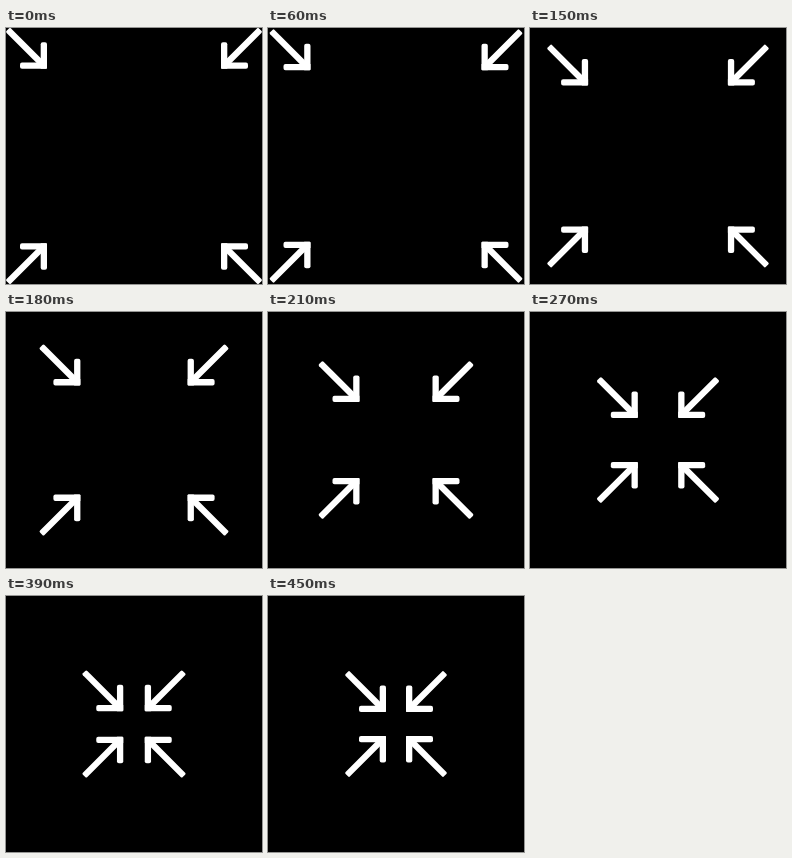
An HTML page with a canvas for the animation above (480 ms loop, 256 px wide and 256 px high).

```html
<!DOCTYPE html>
<html lang="en">
<head>
<meta charset="utf-8">
<title>Converging arrows</title>
<style>
  html, body { margin: 0; width: 100%; height: 100%; overflow: hidden; background: #000; }
  canvas { display: block; }
</style>
</head>
<body>
<canvas id="stage" width="256" height="256"></canvas>
<script>
const ctx = document.getElementById('stage').getContext('2d');
const LOOP = 480, STEP = 30;
const CENTER = 128;
const WIDTH = 6.3;

// Cubic bezier (0.62, 0, 0.16, 1), solved by bisection.
function ease(x) {
  let low = 0, high = 1;
  for (let i = 0; i < 24; i++) {
    const s = (low + high) / 2, r = 1 - s;
    if (3 * r * r * s * 0.62 + 3 * r * s * s * 0.16 + s ** 3 < x) low = s;
    else high = s;
  }
  return low * low * (3 - 2 * low);
}

function bar(x, y, w, h, radii) {
  ctx.beginPath();
  ctx.roundRect(x, y, w, h, radii);
  ctx.fill();
}

// Arrow pointing down-right, with the outer corner of its head at the origin.
function arrow() {
  bar(-WIDTH, -26.6, WIDTH, 26.6, [2, 2, 1, 0]);
  bar(-27, -WIDTH, 27, WIDTH, [2, 0, 1, 2]);
  ctx.save();
  ctx.translate(-39.2, -39.2);
  ctx.rotate(Math.PI / 4);
  bar(0, -WIDTH / 2, 50, WIDTH, [1.5, 0, 0, 1.5]);
  ctx.restore();
}

function draw(time) {
  const progress = ease(Math.floor(time % LOOP / STEP) * STEP / (LOOP - STEP));
  const dx = 87 - 77 * progress;
  const dy = 87.2 - 75.2 * progress;
  ctx.fillStyle = '#000';
  ctx.fillRect(0, 0, 256, 256);
  ctx.fillStyle = '#fff';
  for (const sx of [1, -1]) {
    for (const sy of [1, -1]) {
      ctx.save();
      ctx.translate(CENTER, CENTER);
      ctx.scale(sx, sy);
      ctx.translate(-dx, -dy);
      arrow();
      ctx.restore();
    }
  }
}

let start;
function tick(now) {
  start ??= now;
  draw(Math.max(0, now - start));
  requestAnimationFrame(tick);
}
draw(0);
requestAnimationFrame(tick);
</script>
</body>
</html>
```
